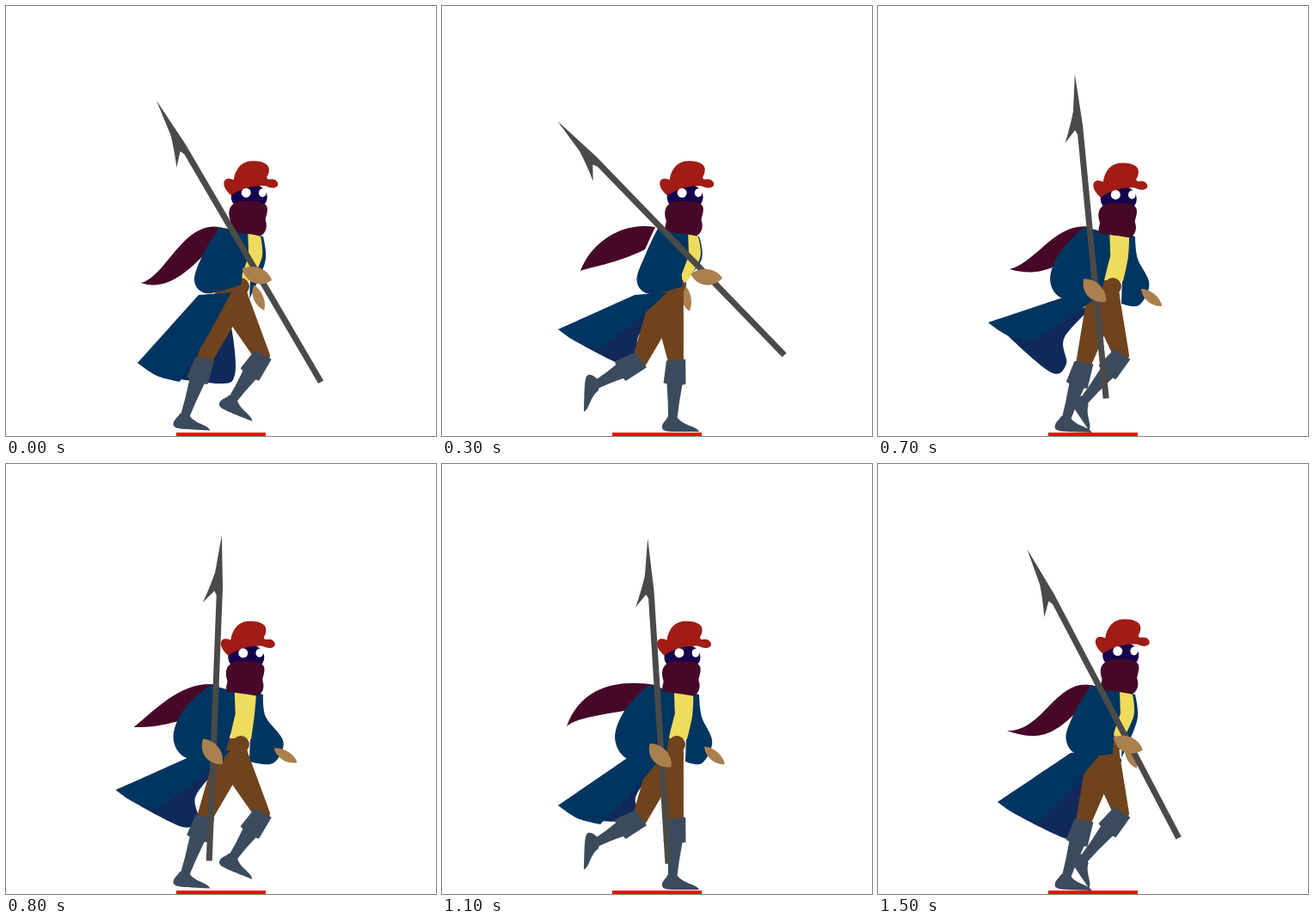
Animation, 500 px wide and 500 px high, one loop 1600 ms. Source, as an HTML page with a canvas:

```html
<!DOCTYPE html>
<html lang="en">
<head>
<meta charset="utf-8">
<title>Running spearman</title>
<style>
html, body { margin: 0; height: 100%; overflow: hidden; background: #fff; }
canvas { display: block; }
</style>
</head>
<body>
<canvas id="stage" width="500" height="500"></canvas>
<script>
const ctx = document.getElementById('stage').getContext('2d');
const LOOP = 1600, STEP = 100, RAD = Math.PI / 180;
const BLUE = '#003560', NAVY = '#10295a', WINE = '#470828', BROWN = '#6f431d',
      SKIN = '#aa804f', YELLOW = '#f0dc5c', STEEL = '#3b4b5b', IRON = '#4a4a48';

// Each key starts with its time in ms.
// knee, ankle, foot angle; the other leg runs half a loop later
const LEG = [
  [0, 231,411, 207,480, 3], [100, 218,414, 184,465, 38], [300, 230,412, 178,441, 92],
  [500, 243,418, 197,440, 92], [700, 283,406, 238,461, 56], [800, 298,407, 262,460, 22],
  [900, 297,398, 290,468, -24], [1100, 272,413, 268,483, 0], [1300, 254,408, 243,485, 0],
  [1500, 239,416, 218,483, 2]
];
// near hand, spear tilt, distance from hand to spear tip
const HAND = [
  [0, 293,312, 30.3,234], [200, 319,303, 45,252], [300, 309,314, 44.1,251], [500, 287,326, 26.4,247],
  [700, 253,330, 5.5,252], [900, 236,337, -6.1,250], [1100, 255,338, 3.6,252], [1500, 292,325, 27.7,255]
];
// back tip and lowest lining point of the coat
const COAT = [
  [0, 153,415, 248,439], [300, 135,376, 212,418], [500, 148,389, 226,420], [700, 128,368, 201,426],
  [900, 130,393, 212,417], [1100, 135,397, 210,416], [1500, 139,393, 220,436]
];
// tip and curl height of the scarf
const SCARF = [
  [0, 157,322, 315], [300, 161,308, 278], [500, 150,299, 298], [700, 153,306, 298],
  [900, 144,305, 268], [1100, 145,305, 258], [1500, 150,310, 312]
];

const hatPath = new Path2D('M254 209C252 200 259 199 265 202C267 188 275 180 287 180C303 180 309 186 305 196C302 200 304 202 309 201C315 201 318 206 316 209C312 213 306 211 302 209C290 208 275 211 262 220C258 216 255 213 254 209Z');
const wrapPath = new Path2D('M261 234C266 226 275 226 283 227C292 226 303 228 304 234C305 240 302 245 302 249C305 256 302 265 296 267C285 265 270 263 261 262C258 256 262 252 261 249C259 243 259 238 261 234Z');
const spearPath = new Path2D('M0 0L61 -3.5L379 -3.5V3.5H70L65 6L79 19Q60 11 43 6Z');
const handPath = new Path2D('M-18 -2C-8 -12 10 -12 19 0C10 12 -8 14 -18 -2Z');
const footPath = new Path2D('M-5 -6C-8 0 -13 2 -12 8C-10 13 0 12 31 12C28 5 14 6 6 -4Z');

// Smooth interpolation through looping keys
function pose(keys, t) {
  t %= LOOP;
  const n = keys.length, key = k => keys[(k + n) % n];
  const time = k => key(k)[0] + LOOP * Math.floor(k / n);
  let i = n - 1;
  while (keys[i][0] > t) i--;
  const span = time(i + 1) - time(i), u = (t - time(i)) / span;
  return keys[i].slice(1).map((p, j) => {
    const value = k => key(k)[j + 1];
    const slope = k => (value(k + 1) - value(k - 1)) / (time(k + 1) - time(k - 1)) * span;
    const q = value(i + 1), a = slope(i), b = slope(i + 1);
    return p + u * (a + u * (3 * (q - p) - 2 * a - b + u * (2 * (p - q) + a + b)));
  });
}

function fill(path, color) {
  ctx.fillStyle = color;
  ctx.fill(path);
}

function placed(path, color, x, y, angle, scaleX = 1, scaleY = scaleX) {
  ctx.save();
  ctx.translate(x, y);
  ctx.rotate(angle);
  ctx.scale(scaleX, scaleY);
  fill(path, color);
  ctx.restore();
}

// Closed outline; in kinds, c marks a corner and s a smooth point
function outline(color, kinds, points) {
  const n = points.length, path = new Path2D(), point = k => points[(k + n) % n];
  const handle = (k, side) => {
    const [x, y] = point(k);
    if (kinds[k % n] === 'c') return [x, y];
    const [ax, ay] = point(k - 1), [bx, by] = point(k + 1);
    return [x + side * (bx - ax) / 6, y + side * (by - ay) / 6];
  };
  path.moveTo(...point(0));
  for (let k = 0; k < n; k++) path.bezierCurveTo(...handle(k, 1), ...handle(k + 1, -1), ...point(k + 1));
  fill(path, color);
}

// Tapered limb with round ends
function limb(color, [ax, ay], [bx, by], ra, rb) {
  const angle = Math.atan2(by - ay, bx - ax), path = new Path2D();
  path.arc(ax, ay, ra, angle + Math.PI / 2, angle - Math.PI / 2);
  path.arc(bx, by, rb, angle - Math.PI / 2, angle + Math.PI / 2);
  fill(path, color);
}

function ellipse(color, x, y, rx, ry) {
  const path = new Path2D();
  path.ellipse(x, y, rx, ry, 0, 0, 2 * Math.PI);
  fill(path, color);
}

const middle = ([ax, ay], [bx, by], dx = 0, dy = 0) => [(ax + bx) / 2 + dx, (ay + by) / 2 + dy];

function drawScarfTail(t) {
  const [x, y, curl] = pose(SCARF, t), bendX = 190 - (y - curl) * .6, path = new Path2D();
  path.moveTo(248, 257);
  path.bezierCurveTo(206, 250, bendX, curl, x, y);
  path.bezierCurveTo(bendX - 5, (curl + y) / 2 + 12, 205, curl / 2 + 160, 236, 283);
  fill(path, WINE);
}

function drawBoot([kx, ky, ax, ay, foot]) {
  const length = Math.hypot(ax - kx, ay - ky);
  const calf = new Path2D(`M-3 -11L26 -13L27 -9Q${length * .7} -6 ${length} -5V5Q${length * .7} 6 27 9L26 13L0 11Z`);
  placed(calf, STEEL, kx, ky, Math.atan2(ay - ky, ax - kx));
  placed(footPath, STEEL, ax, ay, foot * RAD);
}

function drawLegs(t) {
  const hip = [262, 338], legs = [pose(LEG, t + LOOP / 2), pose(LEG, t)];
  limb(BROWN, [273, 326], hip, 10, 19);
  for (const leg of legs) limb(BROWN, hip, leg, 19, 9);
  legs.forEach(drawBoot);
}

function drawHead(t) {
  const drift = 2 * Math.cos(2 * Math.PI * t / LOOP - Math.PI / 6) - 2;
  ctx.save();
  ctx.translate(drift, -.75 * drift);
  ellipse('#15024b', 283, 222, 21, 16);
  fill(hatPath, '#a01c14');
  ellipse('#fff', 279.5, 217, 5.5, 5.5);
  ellipse('#fff', 298.5, 217, 4.3, 5);
  fill(wrapPath, WINE);
  ctx.restore();
}

function draw(t) {
  const [handX, handY, tilt, grip] = pose(HAND, t);
  const [tipX, tipY, liningX, liningY] = pose(COAT, t);
  const swing = handX - 242;

  ctx.clearRect(0, 0, 500, 500);
  drawScarfTail(t);

  const tip = [tipX, tipY], hem = [tipX + 49, tipY + 22], hemMiddle = middle(tip, hem, -2, 4);
  const waistBack = [224, 336], waistFront = [262, 333];
  outline(NAVY, 'ccsss', [[255, 345], hemMiddle, [liningX, liningY], [liningX + 18, liningY - 10], [liningX + 16, 385]]);

  // The far arm swings against the near one
  const farX = 324 - .6 * swing;
  outline(BLUE, 'ccssscc', [[290, 266], [299, 268], [302, 294], [farX - 2, 323], [farX - 14, 348], [283, 346], [284, 318]]);
  placed(handPath, SKIN, farX, 339, (30 + .7 * swing) * RAD, .85, .6);

  const chest = 266 + .3 * swing;
  outline(YELLOW, 'ccscc', [[chest - 6, 262], [291 + .1 * swing, 268], [289 + .17 * swing, 292], [285, 320], [262, 320]]);
  drawLegs(t);
  outline(BLUE, 'cscscsc', [waistBack, middle(waistBack, tip), tip, hemMiddle, hem, middle(hem, waistFront, 0, 3), waistFront]);

  const elbow = 195 + .47 * swing;
  outline(BLUE, 'cssscccc', [
    [237 + .22 * swing, 257], [elbow + 11, 287], [elbow, 319], [elbow + 15, 225 + .35 * handY],
    [253 + .4 * swing, handY + 12], [262 + .25 * swing, 312], [chest + 1, 290], [chest, 264]
  ]);
  drawHead(t);

  const spear = (90 - tilt) * RAD;
  placed(spearPath, IRON, handX - grip * Math.cos(spear), handY - grip * Math.sin(spear), spear);
  placed(handPath, SKIN, handX - 2, handY + 1, (48 - tilt) * RAD);
  ctx.fillStyle = '#f00';
  ctx.fillRect(198, 496, 104, 4);
}

function tick() {
  draw(Math.floor(performance.now() % LOOP / STEP) * STEP);
  requestAnimationFrame(tick);
}
tick();
</script>
</body>
</html>
```
